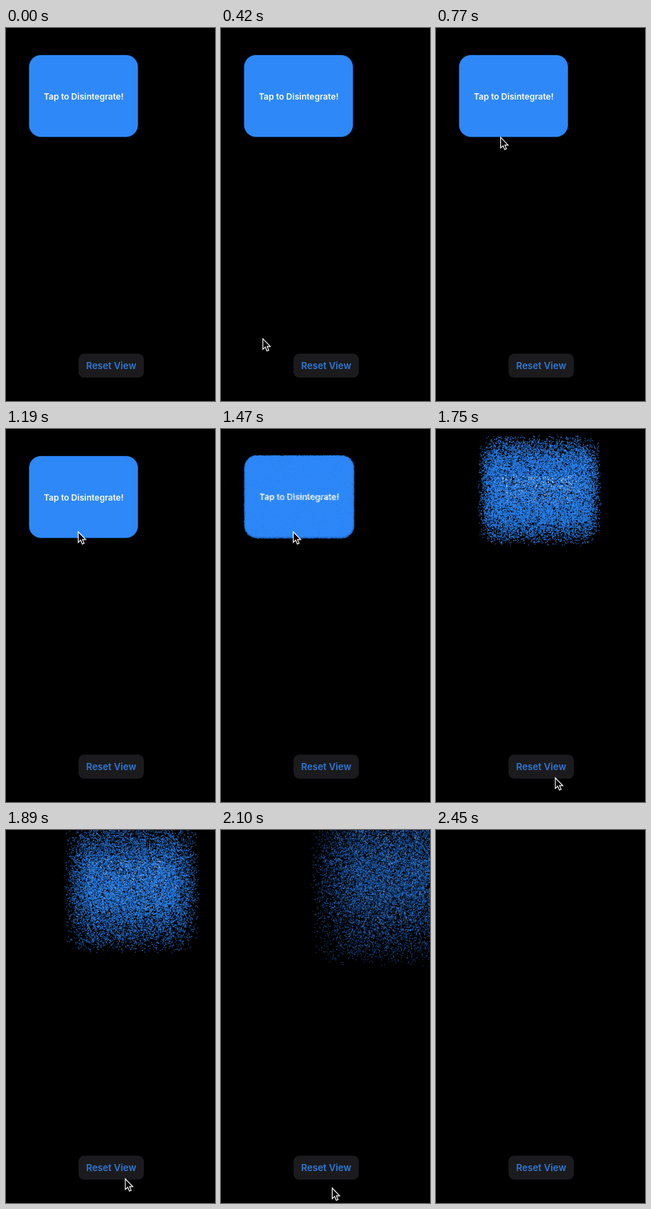
Animation of 296x526 px, one loop 2.73 s. Source, as an HTML page with a canvas:

```html
<!DOCTYPE html>
<html lang="en">
<head>
<meta charset="utf-8">
<title>Disintegrate</title>
<style>
  html, body { margin: 0; width: 100%; height: 100%; overflow: hidden; background: #000; }
  canvas { display: block; width: 296px; height: 526px; }
</style>
</head>
<body>
<canvas id="stage"></canvas>
<script>
const W = 296, H = 526, LOOP = 2730, TICK = 70;
const BURST = 1430, CLEAR = 2450;

const pointer = {
  from: 70, until: 2240, x: 53.5, y: 490.5,
  glides: [
    { start: 350, end: 630, x: 90.5, y: 155.5 },
    { start: 740, end: 910, x: 103, y: 140 },
    { start: 1120, end: 1190, x: 102.3, y: 145 },
    { start: 1470, end: 1750, x: 169, y: 492 },
    { start: 1960, end: 2240, x: 146, y: 518 }
  ]
};
const ARROW = new Path2D('M0 0V15L3.4 11.8L5.8 17.3L8.3 16.2L6 10.9H10.6Z');

const clamp = v => Math.min(1, Math.max(0, v));
const ease = v => v * v * (3 - 2 * v);

function makeContext(canvas, scale) {
  canvas.width = W * scale;
  canvas.height = H * scale;
  const c = canvas.getContext('2d');
  c.scale(scale, scale);
  return c;
}

function panel(c, x, y, w, h, r, fill) {
  c.beginPath();
  c.roundRect(x, y, w, h, r);
  c.fillStyle = fill;
  c.fill();
}

function label(c, text, x, y, size, fill) {
  c.font = `600 ${size}px Inter, Roboto, sans-serif`;
  c.textAlign = 'center';
  c.fillStyle = fill;
  c.fillText(text, x, y);
}

function drawCard(c) {
  panel(c, 32.5, 38, 154.5, 115.7, 17, '#1d5fb4');
  panel(c, 33, 38.5, 153.5, 114.7, 16.5, '#2e88f8');
  label(c, 'Tap to Disintegrate!', 110, 100.6, 12, '#fff');
}

function drawButton(c) {
  panel(c, 102.7, 459.3, 92.6, 33.7, 8, '#1b1b1d');
  label(c, 'Reset View', 149, 481.4, 13.2, '#2e78d6');
}

function drawPointer(c, t) {
  if (t < pointer.from || t >= pointer.until) return;
  let { x, y } = pointer;
  for (const g of pointer.glides) {
    const p = ease(clamp((t - g.start) / (g.end - g.start)));
    x += (g.x - x) * p;
    y += (g.y - y) * p;
  }
  c.save();
  c.translate(x, y);
  c.fillStyle = '#000';
  c.strokeStyle = '#fff';
  c.lineWidth = 1.15;
  c.fill(ARROW);
  c.stroke(ARROW);
  c.restore();
}

let seed = 7;
function random() {
  seed = (seed * 1664525 + 1013904223) % 4294967296;
  return seed / 4294967296;
}
const around = (mid, spread) => mid + spread * (random() * 2 - 1);

// One grain per pixel of the card, carrying that pixel's colour
function makeGrains() {
  const c = makeContext(document.createElement('canvas'), 1);
  drawCard(c);
  const { data } = c.getImageData(0, 0, W, H);
  const grains = [];
  for (let i = 0; i < W * H; i++) {
    const [r, g, b, a] = data.subarray(i * 4, i * 4 + 4);
    if (a < 100) continue;
    grains.push({
      x: i % W,
      y: Math.floor(i / W),
      vx: around(257, 70),
      vy: around(-66, 143),
      life: around(0.85, 0.15),
      color: `rgb(${r},${g},${b})`
    });
  }
  return grains;
}

function drawGrains(c, t) {
  const age = (t - BURST) / 1000;
  const push = age ** 1.7;
  const size = Math.max(1.3, 1.9 - 2 * age);
  const inset = (size - 1) / 2;
  c.globalAlpha = clamp(1.1 - age);
  for (const g of grains) {
    if (age > g.life) continue;
    c.fillStyle = g.color;
    c.fillRect(g.x + g.vx * push - inset, g.y + g.vy * push - inset, size, size);
  }
  c.globalAlpha = 1;
}

const ctx = makeContext(document.getElementById('stage'), window.devicePixelRatio || 1);
const grains = makeGrains();

function draw(t) {
  ctx.fillStyle = '#000';
  ctx.fillRect(0, 0, W, H);
  if (t <= BURST) drawCard(ctx);
  else if (t < CLEAR) drawGrains(ctx, t);
  drawButton(ctx);
  drawPointer(ctx, t);
}

const start = performance.now();
let shown = -1;
function frame() {
  const now = (performance.now() - start) % LOOP;
  const t = Math.floor(now / TICK) * TICK;
  if (t !== shown) draw(shown = t);
  requestAnimationFrame(frame);
}
frame();
</script>
</body>
</html>
```
